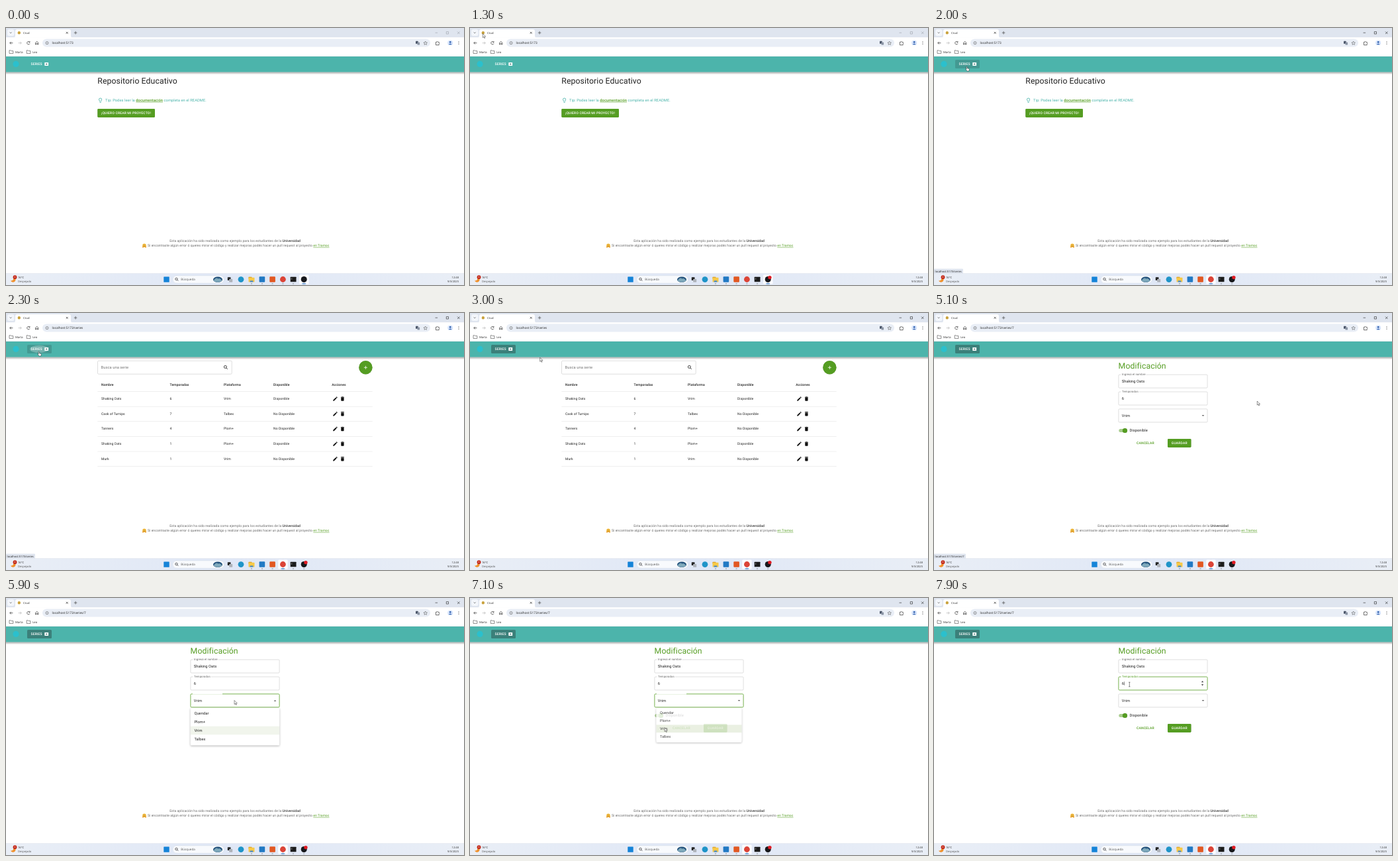
These frames come from a looping animation (692 by 388 pixels, 8000 ms). An HTML page:

```html
<!DOCTYPE html>
<html lang="es">
<head>
<meta charset="utf-8">
<title>Crud</title>
<style>
  html, body { margin: 0; width: 100%; height: 100%; overflow: hidden; background: #fff; }
  svg { display: block; width: 100vw; height: 100vh; }
  text { font-family: Roboto, sans-serif; letter-spacing: .054px; text-rendering: geometricPrecision; white-space: pre; }
  .ui { font-family: "Open Sans", sans-serif; letter-spacing: 0; }
  .btn { font-weight: 500; letter-spacing: .144px; }
  .b { font-weight: 500; }
  .lift { filter: drop-shadow(0 .7px .7px rgba(0,0,0,.32)); }
  .menu { filter: drop-shadow(0 1.6px 1.8px rgba(0,0,0,.3)); }
  .u { text-decoration: underline; }
</style>
</head>
<body>
<svg id="stage" viewBox="0 0 692 388" preserveAspectRatio="none"></svg>
<script>
const GREEN = '#559d22', TEAL = '#4cb4ab', INK = '#212121', GREY = '#666';
const LOOP = 8000;

const text = (x, y, s, size = 5.05, fill = INK, cls = '', extra = '') =>
  `<text x="${x}" y="${y}" font-size="${size}" fill="${fill}" class="${cls}" ${extra}>${s}</text>`;
const ui = (x, y, s, size = 4.3, fill = '#222', extra = '') => text(x, y, s, size, fill, 'ui', extra);
const rect = (x, y, w, h, fill, r = 0, extra = '') =>
  `<rect x="${x}" y="${y}" width="${w}" height="${h}" rx="${r}" fill="${fill}" ${extra}/>`;
const circle = (x, y, r, fill, extra = '') => `<circle cx="${x}" cy="${y}" r="${r}" fill="${fill}" ${extra}/>`;
const line = (d, color, w = .7, extra = '') =>
  `<path d="${d}" fill="none" stroke="${color}" stroke-width="${w}" ${extra}/>`;
const group = (id, body, extra = '') => `<g id="${id}" ${extra}>${body}</g>`;
// 24-unit icon centred on a point
const icon = (x, y, d, fill = '#111', size = 8.65) =>
  `<path transform="translate(${x - size / 2} ${y - size / 2}) scale(${size / 24})" d="${d}" fill="${fill}"/>`;

const EDIT = 'M3 17.25V21h3.75L17.81 9.94l-3.75-3.75L3 17.25zM20.71 7.04c.39-.39.39-1.02 0-1.41l-2.34-2.34a1 1 0 0 0-1.41 0l-1.83 1.83 3.75 3.75z';
const TRASH = 'M6 19c0 1.1.9 2 2 2h8c1.1 0 2-.9 2-2V7H6zM19 4h-3.5l-1-1h-5l-1 1H5v2h14z';
const BULB = 'M9 21c0 .55.45 1 1 1h4c.55 0 1-.45 1-1v-1H9zm3-19a7 7 0 0 0-4 12.74V17c0 .55.45 1 1 1h6c.55 0 1-.45 1-1v-2.26A7 7 0 0 0 12 2zm2.85 11.1l-.85.6V16h-4v-2.3l-.85-.6a5 5 0 1 1 5.7 0z';
const lens = (x, y, r, color, w) => circle(x, y, r, 'none', `stroke="${color}" stroke-width="${w}"`) +
  line(`M${x + r * .7} ${y + r * .7}l${r} ${r}`, color, w);

function browser() {
  const folder = x => line(`M${x} 33.8h2l.8.8h3v3.8h-5.800z`, '#444', .6, 'stroke-linejoin="round"');
  return rect(0, 0, 692, 14.5, '#dfe5ef') +
    rect(2, 2, 10.5, 10, '#f3f6fb', 3) + line('M5.800 6.500l1.300 1.300 1.300-1.300', '#333') +
    '<path d="M11 14.500q3 0 3-3V5q0-3 3-3H95q3 0 3 3v6.500q0 3 3 3z" fill="#fff"/>' +
    circle(19.8, 7.3, 2.2, '#c9a23c') + ui(26, 8.9, 'Crud', 4.2) +
    line('M90.800 5.900l2.800 2.800m0-2.800l-2.800 2.800', '#222') +
    line('M102.800 7.200h4.600m-2.300-2.300v4.600', '#444') +
    group('controls', '<path d="M648.500 7.200h3.600M665.300 5.600h3.200v3.400h-3.200zM682 5.500l3.500 3.500m0-3.500l-3.500 3.500" fill="none" stroke-width=".6"/>') +
    rect(0, 14.2, 692, 28.8, '#fff') + rect(55, 16.4, 586, 12.2, '#e9eef6', 6.1) +
    line('M10.400 22.600h-4.600m2-2l-2 2 2 2', '#333') + line('M18.600 22.600h4.600m-2-2l2 2-2 2', '#b5b5b5') +
    line('M35.800 21.400a2.200 2.200 0 1 0 .200 2M36 20v1.700h-1.700', '#333') +
    line('M44.500 22.300l2.200-2 2.200 2v2.500h-1.400v-1.500h-1.600v1.500h-1.400z', '#333') +
    circle(62, 22.6, 2.1, 'none', 'stroke="#444" stroke-width=".5"') + line('M62 22.300v1.300m0-2.300v.5', '#444', .5) +
    group('url', ui(69.6, 24.3, 'localhost:5173', 4.75)) +
    rect(619, 19.8, 3.6, 4, '#4a5568', .5) + rect(621.5, 21.4, 3.6, 4, '#8b95a5', .5) +
    line('M633.700 20l.8 1.800 2 .2-1.500 1.300.4 2-1.700-1-1.700 1 .4-2-1.500-1.300 2-.2z', '#444', .5) +
    line('M649.500 21.200h1.500q.5-1.800 1.500 0h1.700v1.600q1.500.6 0 1.400v1.500h-4.700z', '#333', .7) +
    circle(671.2, 22.5, 4, '#d6e4fb') + circle(671.2, 21.3, 1.3, '#2858a8') +
    '<path d="M668.800 24.900q2.400-3 4.800 0z" fill="#2858a8"/>' +
    [20.6, 22.6, 24.6].map(y => circle(684, y, .5, '#333')).join('') +
    folder(5) + ui(14, 37.6, 'Marta', 4.2) + folder(31.2) + ui(40.2, 37.6, 'Leo', 4.2) +
    rect(0, 42.6, 692, .5, '#dcdfe5');
}

function header() {
  return rect(0, 66.3, 692, 4, 'url(#shade)') + rect(0, 43, 692, 23.5, TEAL) +
    circle(15, 54.4, 4.6, '#2bc0cd') +
    rect(32, 48, 37, 13, '#3b807a', 1.5, 'id="tabBg"') +
    '<ellipse id="ripple" cx="50" cy="54.500" ry="5.800" fill="#fff"/>' +
    text(37.5, 56.2, 'SERIES', 5.05, '#fff', 'btn') +
    rect(58.3, 52, 5.8, 5.1, '#fff', .6) + line('M59.900 54.500h2.600m-1.300-1.300v2.600', '#356f6a', .7);
}

function footer() {
  return text(346, 322.7, 'Esta aplicación ha sido realizada como ejemplo para los estudiantes de la <tspan class="b" fill="#333">Universidad</tspan>', 5.05, GREY, '', 'text-anchor="middle"') +
    circle(209, 328.3, 2.8, '#f6bd3f') + circle(208, 327.6, .4, '#5a3c10') + circle(210, 327.6, .4, '#5a3c10') +
    line('M207.700 329q1.300 1.300 2.600 0', '#5a3c10', .4) + circle(207, 330.6, 1.1, '#e89a2c') + circle(211, 330.6, 1.1, '#e89a2c') +
    text(214, 329.9, `Si encontraste algún error ó queres mirar el código y realizar mejoras podés hacer un pull request al proyecto <tspan class="u" fill="${GREEN}">en Tramoc</tspan>`, 5.05, GREY);
}

function homePage() {
  return text(138.3, 83.8, 'Repositorio Educativo', 12.25, INK, '', 'style="letter-spacing:.09px"') +
    icon(142.6, 109.2, BULB, TEAL) +
    text(150, 110.7, `Tip: Podes leer la <tspan class="b u" fill="${GREEN}">documentación</tspan> completa en el README.`, 5.766, TEAL) +
    rect(138.3, 122, 86.7, 13, GREEN, 1.4, 'class="lift"') +
    text(144, 130.3, '¡QUIERO CREAR MI PROYECTO!', 5.05, '#fff', 'btn');
}

const COLS = [144, 247.6, 329, 404, 492.2];
const ROWS = [
  ['Shaking Oats', 6, 'Vrim', 'Disponible'],
  ['Cask of Turnips', 7, 'Talbex', 'No Disponible'],
  ['Tanners', 4, 'Plom+', 'No Disponible'],
  ['Shaking Oats', 1, 'Plom+', 'Disponible'],
  ['Murk', 1, 'Vrim', 'No Disponible']
];

function listPage() {
  const rule = y => rect(138.3, y, 415.5, .45, '#dcdcdc');
  const heads = ['Nombre', 'Temporadas', 'Plataforma', 'Disponible', 'Acciones'];
  return rect(138.5, 72.2, 202.7, 20, '#fff', 1.4, 'stroke="#bdbdbd" stroke-width=".5"') +
    text(143.6, 84.1, 'Busca una serie', 5.766, '#757575') + lens(331.4, 81.4, 2, '#111', .8) +
    circle(543.4, 82.2, 10.2, GREEN, 'class="lift"') + line('M540.900 82.300h5m-2.500-2.500v5', '#fff', .8) +
    heads.map((h, i) => text(COLS[i], 109.6, h, 5.05, INK, 'b')).join('') + rule(118.2) +
    ROWS.map((row, r) => {
      const y = 129.4 + r * 22.65;
      return row.map((s, i) => text(COLS[i], y + 1.7, s)).join('') +
        icon(497.5, y + .2, EDIT) + icon(508.4, y + .2, TRASH) + rule(y + 11.5);
    }).join('');
}

const field = (y, label, labelW, value, id) =>
  rect(278.9, y, 134.2, 20, '#fff', 1.4, `id="${id}"`) +
  (label ? rect(282.6, y - 1, labelW, 2, '#fff') + text(284, y + 1.3, label, 4.33, GREY, '', `id="${id}Label"`) : '') +
  text(283.8, y + 11.9, value, 5.766);

function formPage() {
  return text(278.6, 83.8, 'Modificación', 12.25, GREEN, '', 'style="letter-spacing:.09px"') +
    field(93.1, 'Ingresá el nombre', 38, 'Shaking Oats', 'name') +
    field(119, 'Temporadas', 27, '6', 'seasons') +
    group('spin', '<path d="M403.900 127.300l1.700-2.200 1.700 2.200zM403.900 130.200l1.700 2.200 1.700-2.200z" fill="#444"/>') +
    rect(287.4, 126.2, .5, 5.6, '#222', 0, 'id="caret"') +
    field(144.9, '', 0, 'Vrim', 'platform') + rect(282, 144, 45, 1.6, '#fff', 0, 'id="gap"') +
    '<path id="arrow" d="M404.700 154.100h3.600l-1.800 1.800z" fill="#666"/>' +
    rect(279.3, 175, 11.5, 5, '#a9cd8e', 2.5) + circle(288.5, 177.5, 3.6, GREEN, 'class="lift"') +
    text(295.4, 179.4, 'Disponible', 5.766) +
    text(306, 198.2, 'CANCELAR', 5.05, GREEN, 'btn') +
    rect(353, 190, 35.5, 13, GREEN, 1.4, 'class="lift"') + text(358.8, 198.2, 'GUARDAR', 5.05, '#fff', 'btn') +
    group('menu', rect(278.8, 166, 134.3, 56.6, '#fff', 1.4) +
      ['Quendar', 'Plom+', 'Vrim', 'Talbex'].map((s, i) =>
        rect(278.8, 167.7 + i * 12.97, 134.3, 12.97, '#fff', 0, `id="item${i}"`) +
        text(284.4, 176.2 + i * 12.97, s, 5.766)).join(''), 'class="menu"');
}

function taskbar() {
  const dash = x => rect(x - 1.2, 385.6, 2.4, .8, '#8a8f98', .4);
  return rect(0, 370.6, 692, 17.4, 'url(#bar)') + rect(0, 370.6, 692, .4, '#d5dae4') +
    '<path d="M12 376a4 4 0 1 1-5 5.500q4.500.5 5-5.500z" fill="#f0912d"/>' + circle(13.5, 376.2, 2.9, '#c42b1c') +
    ui(13.5, 377.4, '4', 3.4, '#fff', 'text-anchor="middle"') +
    ui(18, 378, '16°C', 4.1) + ui(18, 383.8, 'Despejado', 4.1, '#555') +
    rect(238.3, 375.4, 8.4, 8.4, '#1583d8', .6) +
    rect(252, 373.9, 77.5, 11.4, '#f8fafd', 5.7, 'stroke="#cfd6e2" stroke-width=".4"') +
    lens(257.5, 379, 1.7, '#222', .7) + ui(264.2, 381.2, 'Búsqueda', 4.6, '#555') +
    '<ellipse cx="320" cy="379.800" rx="7" ry="4.300" fill="#24527c"/><path d="M313.500 381.500q4-6 7-3 3-2 6 3-6.500 4.500-13 0z" fill="#7fa9bb"/>' +
    rect(443, 372.6, 14.5, 14, '#fbfcff', 1.5, 'id="glow"') +
    rect(334.8, 376.2, 4.7, 4.7, '#222', .5) + rect(337.2, 379, 5, 4.8, '#aeb3ba', .5) +
    circle(355, 379.6, 4.4, '#1f94c8') +
    rect(366.5, 375.8, 5, 3, '#d99a1c', .6) + rect(366.5, 376.8, 9, 6.8, '#f7c948', .6) + rect(368.6, 381.400, 4.800, 2.2, '#3b83d0', .4) +
    rect(382.6, 375.2, 8.6, 8.6, '#2179c4', 1) + rect(398.3, 375.2, 8.6, 8.6, '#e25822', 1.2) +
    circle(418.4, 379.5, 4.4, '#db4437') + rect(429.7, 375.7, 8.8, 7.6, '#1b1b1b', .6) + line('M431 377.600l1.200 1-1.200 1', '#eee', .5) +
    circle(450.2, 379.5, 4.5, '#17181c') +
    circle(452.9, 376.6, 2.7, '#e01b24', 'id="rec"') +
    [371, 387, 402.6, 418.4, 434, 450.2].map(dash).join('') +
    rect(447.2, 385.5, 6, .9, '#2a7bd0', .45, 'id="active"') +
    ui(684, 378, '12:48', 4.1, '#333', 'text-anchor="end"') + ui(684, 383.8, '9/3/2025', 4.1, '#333', 'text-anchor="end"');
}

const cursors =
  group('cursor',
    group('point', '<path d="M0 0v6l1.400-1.300 1 2.300 1-.4-1-2.200h1.900z" fill="#fff" stroke="#111" stroke-width=".45"/>') +
    group('hand', '<path d="M-.6.500q.6-.9 1.200 0v2.300l2.600.6q.7.2.5 1l-.5 2.600h-2.900l-1.900-2.700q.3-.8 1 0z" fill="#fff" stroke="#111" stroke-width=".45"/>') +
    group('beam', line('M-1.200-3.300h2.400M0-3.300v6.600M-1.200 3.300h2.400', '#111', .5)));

const stage = document.getElementById('stage');
stage.innerHTML =
  `<defs><linearGradient id="shade" x2="0" y2="1"><stop stop-color="#000" stop-opacity=".35"/><stop offset="1" stop-color="#000" stop-opacity="0"/></linearGradient>
  <linearGradient id="bar"><stop stop-color="#e9eef6"/><stop offset=".5" stop-color="#dfe7f6"/><stop offset="1" stop-color="#e9eef6"/></linearGradient></defs>` +
  rect(0, 0, 692, 388, '#fff') + browser() + header() + footer() +
  group('home', homePage()) + group('list', listPage()) + group('form', formPage()) +
  group('status', rect(0, 363.4, 44, 7.4, '#dfe5ef', 1, 'id="statusBg"') + ui(1.6, 368.5, '', 4.08)) + taskbar() + cursors;

const el = {};
stage.querySelectorAll('[id]').forEach(n => el[n.id] = n);
const urlText = el.url.firstChild, statusText = el.status.lastChild;
const show = (id, on) => el[id].style.display = on ? '' : 'none';
const set = (id, attrs) => { for (const k in attrs) el[id].setAttribute(k, attrs[k]); };
const clamp = v => Math.max(0, Math.min(1, v));
const ease = v => v * v * (3 - 2 * v);

// pointer path: time, x, y
const PATH = [
  [100, 448, 378], [300, 187, 280], [500, 187, 280], [800, 185, 219], [950, 185, 219], [1300, 19.3, 8.5],
  [1450, 19.3, 8.5], [1850, 49.6, 58], [2800, 49.6, 58], [3700, 490, 130.5], [3850, 492.4, 131.2],
  [4950, 492.4, 131.5], [5050, 488.3, 133], [5200, 488.3, 133], [5600, 345, 154.5], [5950, 345, 154.5],
  [6650, 293.5, 197], [6800, 294, 197.6], [7050, 294, 197.6], [7550, 295.3, 130.5], [8000, 295.3, 130.5]
];
function pointer(t) {
  let i = 1;
  while (i < PATH.length - 1 && PATH[i][0] < t) i++;
  const a = PATH[i - 1], b = PATH[i], k = ease(clamp((t - a[0]) / (b[0] - a[0])));
  return [a[1] + (b[1] - a[1]) * k, a[2] + (b[2] - a[2]) * k];
}

function outline(id, focused) {
  set(id, { stroke: focused ? GREEN : '#bdbdbd', 'stroke-width': focused ? .8 : .5 });
}

function render(t) {
  const page = t < 2200 ? 'home' : t < 5000 ? 'list' : 'form';
  for (const p of ['home', 'list', 'form']) show(p, p === page);
  urlText.textContent = 'localhost:5173' + { home: '', list: '/series', form: '/series/7' }[page];

  const front = t >= 2000;
  set('controls', { stroke: front ? '#222' : '#9aa0a8' });
  set('glow', { x: front ? 411.2 : 443 });
  set('active', { x: front ? 415.4 : 447.2 });
  show('rec', t >= 200);

  show('tabBg', t >= 1800);
  set('tabBg', { 'fill-opacity': t < 2800 ? .5 : .5 + .5 * clamp((t - 2800) / 200) });
  const grow = clamp((t - 2050) / 300);
  show('ripple', t > 2050 && t < 2800);
  set('ripple', { rx: 4 + 12 * grow, 'fill-opacity': .25 * clamp((2800 - t) / 300) });

  const edit = t >= 3700;
  show('status', (t >= 1900 && t < 3000) || (edit && t < 5300));
  statusText.textContent = 'localhost:5173/series' + (edit ? '/7' : '');
  set('statusBg', { width: edit ? 48 : 44 });

  const [x, y] = pointer(t);
  const open = clamp((t - 5650) / 200) * clamp((7250 - t) / 200);
  const onSelect = t >= 5650 && t < 7800, onSeasons = t >= 7800;
  outline('name', false);
  outline('seasons', onSeasons);
  outline('platform', onSelect);
  set('seasonsLabel', { fill: onSeasons ? GREEN : GREY });
  show('gap', onSelect);
  show('spin', t >= 7450);
  show('caret', onSeasons);
  set('arrow', { transform: t >= 5650 && t < 7050 ? 'rotate(180 406.5 155)' : '' });
  show('menu', open > 0);
  const k = .75 + .25 * ease(open);
  set('menu', { opacity: ease(open), transform: `translate(346 166) scale(${k} ${k * k}) translate(-346 -166)` });
  for (let i = 0; i < 4; i++) {
    const over = Math.floor((y - 167.7) / 12.97) === i;
    set('item' + i, { fill: i === 2 ? (over ? '#e6eedd' : '#f1f5ec') : over ? '#f5f5f5' : '#fff' });
  }

  const hand = (t >= 1800 && t < 2900) || (t >= 3700 && t < 5000) || (y > 167.7 && t > 5900 && t < 7050);
  const beam = t > 7050 && y < 139;
  show('cursor', t >= 100);
  show('hand', hand);
  show('beam', beam);
  show('point', !hand && !beam);
  set('cursor', { transform: `translate(${x} ${y})` });
}

const start = performance.now();
function tick() {
  render((performance.now() - start) % LOOP);
  requestAnimationFrame(tick);
}
tick();
</script>
</body>
</html>
```
